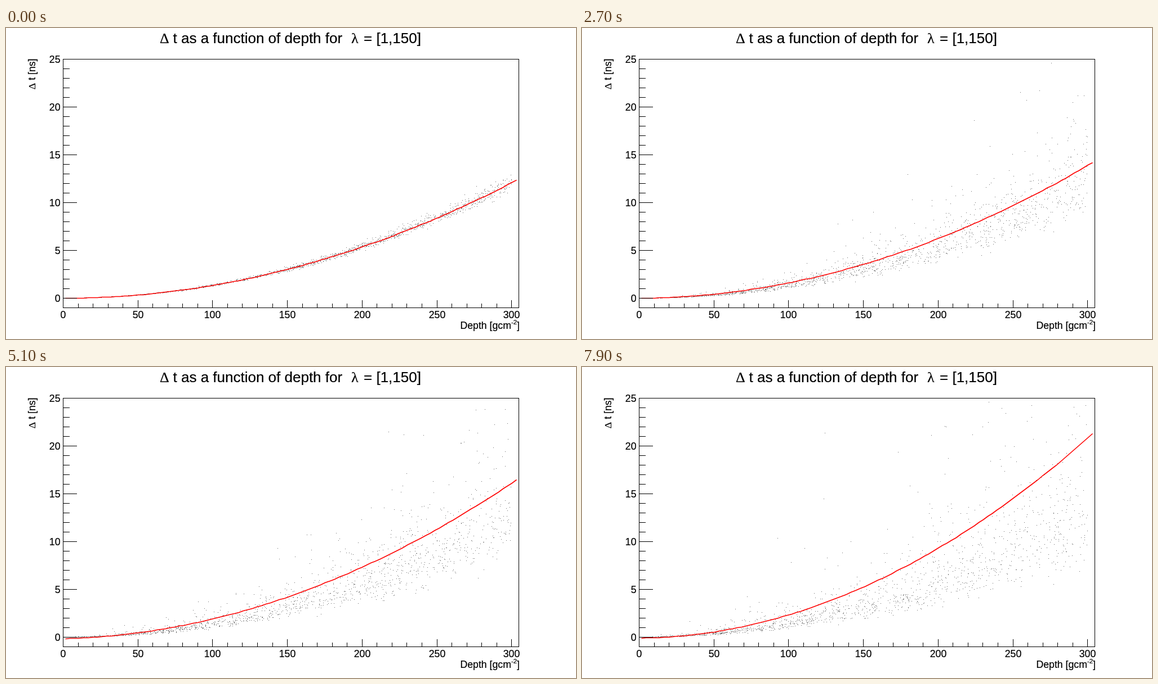
Recreate the animation shown at these times as an HTML page with a canvas. Size 1012x553 px, loop 8 s.

```html
<!DOCTYPE html>
<html lang="en">
<head>
<meta charset="utf-8">
<title>Time spread against depth</title>
<style>
  html, body { margin: 0; width: 100%; height: 100%; overflow: hidden; background: #fff; }
  canvas, svg { position: absolute; left: 0; top: 0; width: 1012px; height: 553px; }
  text { font: 17.7px "Liberation Sans", Arial, sans-serif; white-space: pre; stroke: #000; stroke-width: .2px; }
  .title { font-size: 26px; }
  .greek { font-family: "Liberation Serif", "Times New Roman", serif; }
  .sup { font-size: 11.4px; }
  .end { text-anchor: end; }
  .mid { text-anchor: middle; }
</style>
</head>
<body>
<canvas id="plot" width="1012" height="553"></canvas>
<svg id="axes" viewBox="0 0 1012 553">
  <text class="title greek" x="273" y="27">Δ</text>
  <text class="title" x="296.5" y="27">t as a function of depth for</text>
  <text class="title greek" x="613" y="27">λ</text>
  <text class="title" x="635" y="27">= [1,150]</text>
  <text class="end" x="912" y="535">Depth [gcm<tspan class="sup" dy="-8">-2</tspan><tspan dy="8">]</tspan></text>
  <text class="end" transform="translate(52 54.5) rotate(-90)"><tspan class="greek">Δ</tspan> t [ns]</text>
  <path id="lines" fill="none" stroke="#000" shape-rendering="crispEdges"/>
</svg>
<script>
const LOOP = 8000, STEP = 100, POINTS = 1500;
const X_MAX = 305, Y_MAX = 25, SEGMENTS = 100, CURVATURE = 1.339e-4;
const px = depth => 101 + depth * 2.654;
const py = delay => 480 - delay * 17;

// time, fitted delay at depths 0, 200 and 303.5, relative spread
const KEYS = [
  [0, 0, 5.36, 12.35, .04],
  [900, .02, 5.6, 12.95, .12],
  [1500, .03, 5.8, 13.45, .17],
  [2700, 0, 6.23, 14.2, .22],
  [4400, -.05, 7, 15.95, .27],
  [5700, -.25, 7.6, 16.9, .3],
  [6800, .12, 8.38, 19.55, .335],
  [7900, -.1, 9.3, 21.3, .36]
];

function drawAxes() {
  const svg = document.getElementById("axes");
  let d = "M101.5 55.5H910.5V497.5H101.5Z";
  const label = (value, cls, x, y) => {
    const text = document.createElementNS(svg.namespaceURI, "text");
    text.setAttribute("class", cls);
    text.setAttribute("x", x);
    text.setAttribute("y", y);
    text.textContent = value;
    svg.append(text);
  };
  for (let v = 0; v <= 300; v += 10) {
    const x = Math.round(px(v)) + .5, major = v % 50 === 0;
    d += `M${x} 497v${major ? -13 : -7}`;
    if (major) label(v, "mid", x, 516);
  }
  for (let v = 0; v <= Y_MAX; v++) {
    const major = v % 5 === 0;
    d += `M101 ${py(v) + .5}h${major ? 25 : 12}`;
    if (major) label(v, "end", 96.5, py(v) + 6.5);
  }
  document.getElementById("lines").setAttribute("d", d);
}

function randomFrom(seed) {
  return () => {
    seed = seed + 0x6D2B79F5 | 0;
    let t = Math.imul(seed ^ seed >>> 15, 1 | seed);
    t = t + Math.imul(t ^ t >>> 7, 61 | t) ^ t;
    return ((t ^ t >>> 14) >>> 0) / 4294967296;
  };
}

function stateAt(time) {
  const i = Math.max(1, KEYS.findIndex(key => key[0] >= time));
  const from = KEYS[i - 1], to = KEYS[i];
  const k = (time - from[0]) / (to[0] - from[0]);
  return from.map((v, j) => v + (to[j] - v) * k);
}

const ctx = document.getElementById("plot").getContext("2d");

function drawPoints(spread, seed) {
  const random = randomFrom(seed);
  const scale = CURVATURE * (1 + 1.2 * spread * spread);
  ctx.fillStyle = "#666";
  for (let i = 0; i < POINTS; i++) {
    const depth = random() * 300;
    const normal = Math.sqrt(-2 * Math.log(1 - random())) * Math.cos(2 * Math.PI * random());
    const delay = scale * depth * depth / (1 + spread * normal);
    if (delay >= 0 && delay < Y_MAX) {
      ctx.fillRect(Math.round(px(depth)), Math.round(py(delay)), 1, 1);
    }
  }
}

function drawFit(start, middle, end) {
  const x1 = 200, x2 = 303.5;
  const s1 = (middle - start) / x1, s2 = (end - start) / x2;
  const c = (s2 - s1) / (x2 - x1), b = s1 - c * x1;
  ctx.beginPath();
  for (let i = 0; i < SEGMENTS; i++) {
    const x = (i + .5) * X_MAX / SEGMENTS;
    ctx.lineTo(Math.round(px(x)) + .5, Math.round(py(start + b * x + c * x * x)) + .5);
  }
  ctx.strokeStyle = "#f00";
  ctx.lineWidth = 1.6;
  ctx.stroke();
}

let shown = -1;
function tick() {
  const step = Math.floor(performance.now() % LOOP / STEP);
  if (step !== shown) {
    shown = step;
    const [, start, middle, end, spread] = stateAt(step * STEP);
    ctx.clearRect(0, 0, 1012, 553);
    drawPoints(spread, step * 7919 + 17);
    drawFit(start, middle, end);
  }
  requestAnimationFrame(tick);
}

drawAxes();
tick();
</script>
</body>
</html>
```
